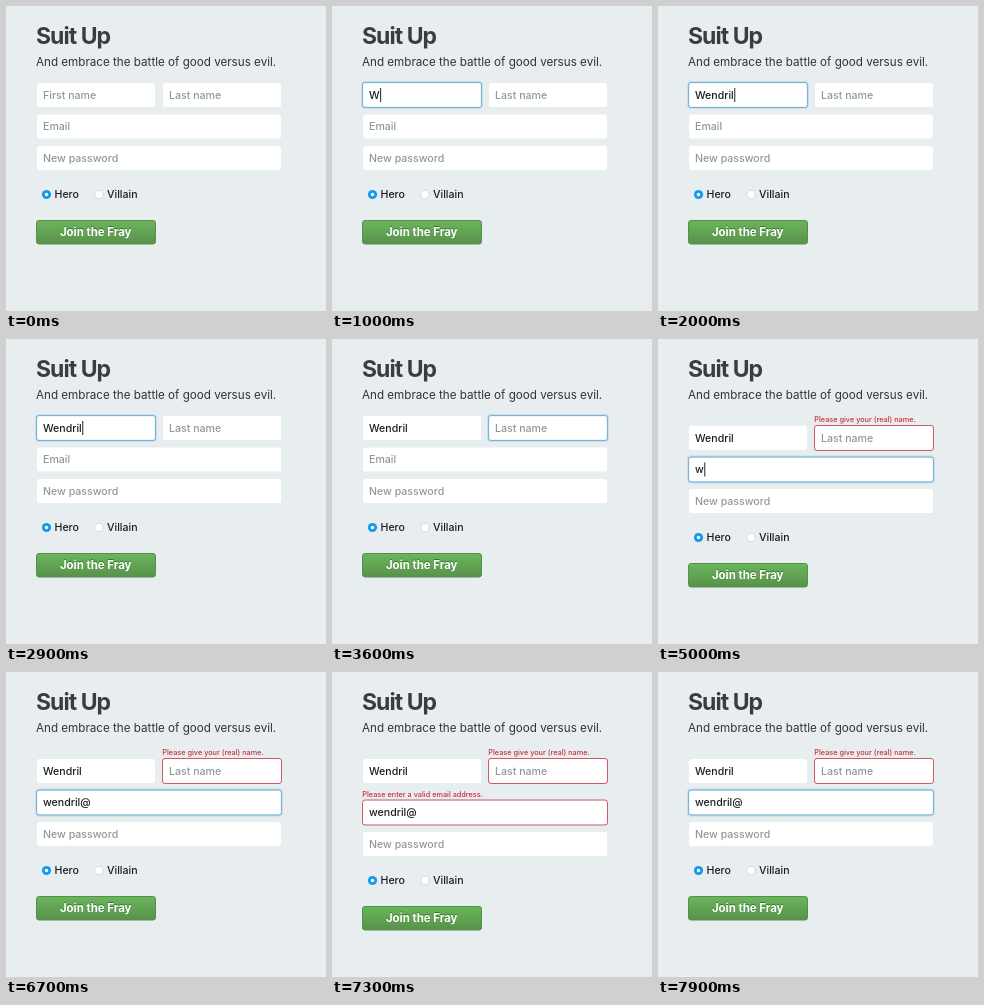
An HTML page for the animation above (8 s loop, 320 px wide and 305 px high).

```html
<!DOCTYPE html>
<html lang="en">
<head>
<meta charset="utf-8">
<title>Sign-up form</title>
<style>
  html, body { margin: 0; width: 100%; height: 100%; overflow: hidden; background: #e8edf0; }
  svg { display: block; width: 320px; height: 305px; font: 500 10.6px Inter, "Open Sans", sans-serif; }
  text { white-space: pre; fill: #1b1e20; }
  .title { font-size: 23px; font-weight: 700; letter-spacing: -.95px; fill: #373d40; }
  .intro { font-size: 11.65px; font-weight: 400; fill: #2f3437; }
  .hint { fill: #92979a; }
  .box { fill: #fff; }
  .ring { fill: none; stroke: #76b3d8; }
  .glow { fill: none; stroke: #76b3d8; stroke-width: 2.4; opacity: .25; }
  .bad { fill: none; stroke: #cc5b64; }
  .error { font-size: 7.3px; fill: #c9303b; }
  .label { font-size: 11.4px; font-weight: 700; }
</style>
</head>
<body>
<svg viewBox="0 0 320 305">
  <defs>
    <linearGradient id="green" x2="0" y2="1">
      <stop stop-color="#6bb65c"/><stop offset="1" stop-color="#58914b"/>
    </linearGradient>
  </defs>
  <rect width="320" height="305" fill="#e8edf0"/>
  <text class="title" x="30" y="38">Suit Up</text>
  <text class="intro" x="30" y="60">And embrace the battle of good versus evil.</text>
  <g id="fields"></g>
  <g id="footer">
    <circle cx="40.5" cy="188.5" r="4.6" fill="#149bea"/>
    <circle cx="40.5" cy="188.5" r="1.7" fill="#fff"/>
    <text x="48.5" y="192">Hero</text>
    <circle cx="93" cy="188.5" r="4.2" fill="#fff" stroke="#cfd4d7" stroke-width=".8"/>
    <text x="101" y="192">Villain</text>
    <rect x="30.5" y="214.5" width="119" height="23.5" rx="2.5" fill="url(#green)" stroke="#55904a"/>
    <text class="label" x="89.7" y="229" text-anchor="middle" style="fill:#39742f">Join the Fray</text>
    <text class="label" x="89.7" y="230" text-anchor="middle" style="fill:#fff">Join the Fray</text>
  </g>
</svg>
<script>
const LOOP = 8000, SHIFT = 10;
const $ = id => document.getElementById(id);

function field(x, y, width, hint, error = '') {
  const g = document.createElementNS('http://www.w3.org/2000/svg', 'g');
  const rect = (cls, grow) => `<rect class="${cls}" x="${x - grow}" y="${y - grow}"
    width="${width + 2 * grow}" height="${24 + 2 * grow}" rx="2.5"/>`;
  g.innerHTML = rect('box', 0) + rect('bad', .5) + rect('glow', .8) + rect('ring', .5) +
    `<text class="hint" x="${x + 6}" y="${y + 15.5}">${hint}</text>
     <text class="value" x="${x + 6}" y="${y + 15.5}"></text>
     <rect class="caret" y="${y + 5}" width="1" height="14" fill="#222"/>
     <text class="error" x="${x - .7}" y="${y - 4}">${error}</text>`;
  $('fields').append(g);
  const part = cls => g.querySelector('.' + cls);
  const show = (cls, on) => part(cls).style.opacity = on;

  return ({ dy = 0, value = '', focus = false, caret = false, bad = false, note = 0 }) => {
    g.setAttribute('transform', `translate(0 ${dy})`);
    const text = part('value');
    text.textContent = value;
    part('caret').setAttribute('x', x + 6.5 + (value ? text.getComputedTextLength() : 0));
    show('hint', value ? 0 : 1);
    show('ring', focus ? 1 : 0);
    show('glow', focus ? .25 : 0);
    show('caret', caret ? 1 : 0);
    show('bad', bad ? 1 : 0);
    show('error', note);
  };
}

const first = field(31, 77, 118, 'First name');
const last = field(157, 77, 118, 'Last name', 'Please give your (real) name.');
const email = field(31, 108.5, 244, 'Email', 'Please enter a valid email address.');
const password = field(31, 140, 244, 'New password');

const within = (t, a, b) => t >= a && t < b;
const ease = (t, start, length) => {
  const p = Math.min(1, Math.max(0, (t - start) / length));
  return p * p * (3 - 2 * p);
};
// Text entered so far, and the moment of the latest key press.
function typing(t, text, start, step) {
  const count = Math.min(text.length, Math.max(0, Math.floor((t - start) / step) + 1));
  return { value: text.slice(0, count), key: count ? start + (count - 1) * step : 0 };
}
// The caret stays lit for half a second after each focus or key press.
const blink = (t, since) => (t - since) % 1000 < 500;

function draw(t) {
  const a = typing(t, 'Wendril', 990, 130);
  const b = typing(t, 'wendril@', 4980, 155);
  const nameNote = ease(t, 3650, 400);
  const mailNote = ease(t, 6710, 390) - ease(t, 7330, 370);
  const dy = SHIFT * nameNote, dy2 = dy + SHIFT * mailNote;

  const onFirst = within(t, 490, 3090);
  const onLast = within(t, 3090, 3650);
  const refocused = t >= 7330;
  const onEmail = within(t, 4290, 6710) || refocused;

  first({ dy, value: a.value, focus: onFirst, caret: onFirst && blink(t, Math.max(490, a.key)) });
  last({ dy, focus: onLast, caret: onLast && blink(t, 3090), bad: t >= 3650, note: nameNote });
  email({
    dy: dy2, value: b.value, focus: onEmail,
    caret: onEmail && blink(t, refocused ? 7330 : Math.max(4290, b.key)),
    bad: within(t, 6710, 7330), note: mailNote
  });
  password({ dy: dy2 });
  $('footer').setAttribute('transform', `translate(0 ${dy2})`);
}

const begin = performance.now();
function tick() {
  draw((performance.now() - begin) % LOOP);
  requestAnimationFrame(tick);
}
tick();
</script>
</body>
</html>
```
